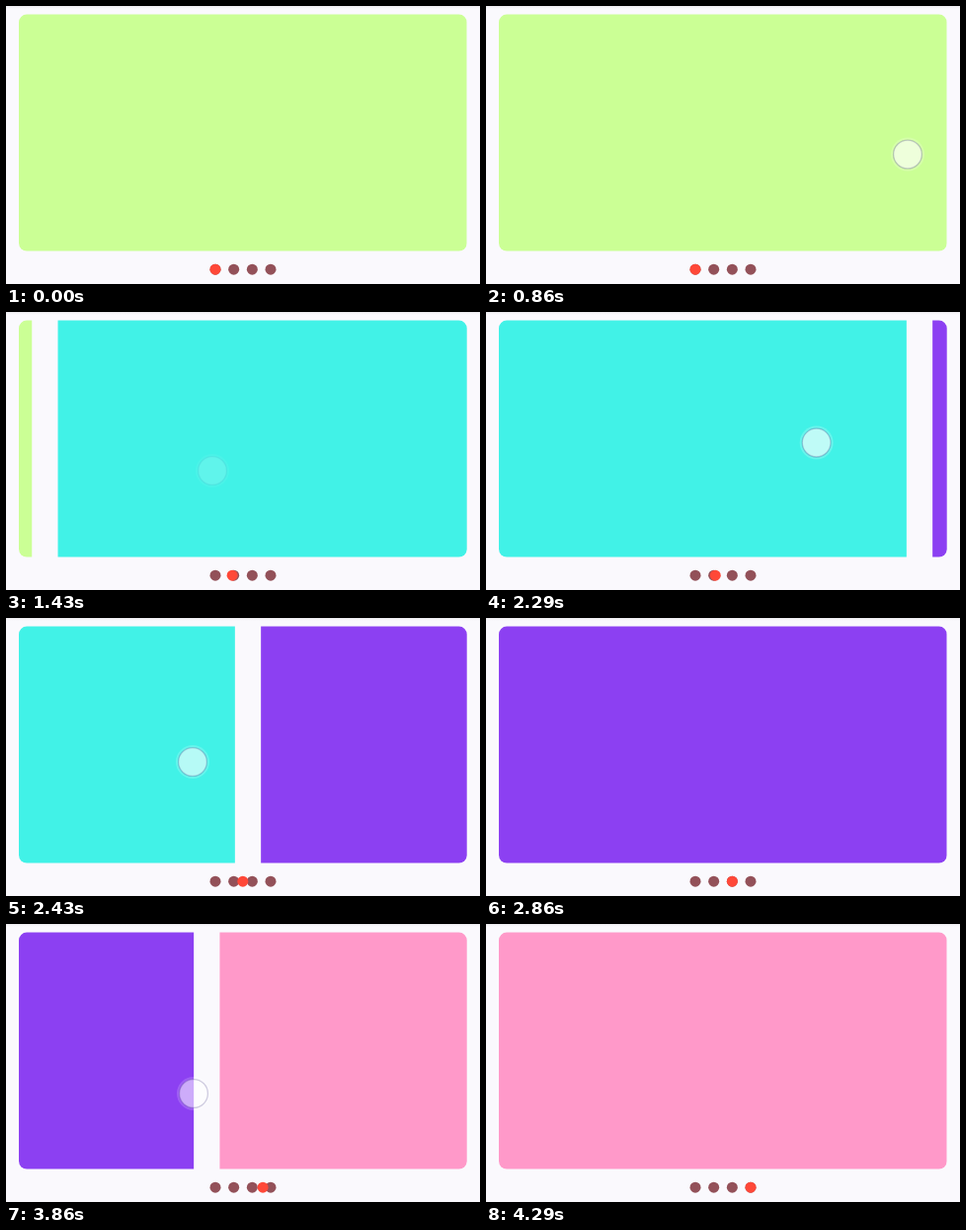
Animation, 480 px wide and 282 px high, one loop 5.14 s. Source, as an HTML page:

```html
<!DOCTYPE html>
<html lang="en">
<head>
<meta charset="utf-8">
<title>Page carousel</title>
<style>
  html, body { margin: 0; width: 100%; height: 100%; overflow: hidden; background: #faf9fd; }
  svg { display: block; width: 100%; height: 100%; }
</style>
</head>
<body>
<svg viewBox="0 0 480 282">
  <defs>
    <clipPath id="viewport"><rect x="13" y="8.6" width="453.7" height="239.9" rx="8"/></clipPath>
    <linearGradient id="shade" x2="0" y2="1">
      <stop stop-color="#efeef2"/><stop offset="1" stop-color="#faf9fd"/>
    </linearGradient>
  </defs>
  <rect width="480" height="282" fill="#faf9fd"/>
  <rect width="480" height="3" fill="url(#shade)"/>
  <g clip-path="url(#viewport)"><g id="pages"></g></g>
  <g id="dots" fill="#935159"></g>
  <g id="touch">
    <circle r="17" fill="#fff" fill-opacity=".2"/>
    <circle r="14.4" fill="#fff" fill-opacity=".58" stroke="#50468c" stroke-opacity=".3" stroke-width="1.3"/>
  </g>
</svg>
<script>
const LOOP = 5140;
const FPS = 7;
const STRIDE = 480;
const DOT_GAP = 56 / 3;
const SLOP = 36;       // finger travel before the page follows
const FLING_RATE = 2;  // decay per tick after release
const FADE_RATE = 0.75;
const COLORS = ['#cbff95', '#41f2e7', '#8c40f2', '#ff99c9'];

// Times in ticks of 1/7 s; the finger is down from the tick containing start.
const SWIPES = [
  { start: 6.48, release: 8.99, from: { x: 427, y: 150.5 }, to: { x: 209, y: 161 } },
  { start: 15.52, release: 16.91, from: { x: 411.5, y: 132 }, to: { x: 189, y: 146 } },
  { start: 24.2, release: 26.81, from: { x: 408.5, y: 150.5 }, to: { x: 190, y: 172 } }
];

const pages = document.getElementById('pages');
const dots = document.getElementById('dots');
const touch = document.getElementById('touch');

function add(parent, tag, attributes) {
  const node = document.createElementNS('http://www.w3.org/2000/svg', tag);
  for (const name in attributes) node.setAttribute(name, attributes[name]);
  return parent.appendChild(node);
}

const addDot = (index, extra) =>
  add(dots, 'circle', { cx: 212 + index * DOT_GAP, cy: 267.2, r: 5.5, ...extra });

COLORS.forEach((fill, i) => {
  add(pages, 'rect', { x: 13 + i * STRIDE, y: 8, width: 453.7, height: 242, fill });
  addDot(i);
});
const activeDot = addDot(0, { fill: '#ff4838' });

const clamp = value => Math.min(1, Math.max(0, value));
const mix = (a, b, amount) => a + (b - a) * amount;

function swipeState({ start, release, from, to }, tick) {
  const progress = clamp((tick - start) / (release - start));
  const x = mix(from.x, to.x, progress);
  const y = mix(from.y, to.y, progress ** 3);
  const sinceRelease = Math.max(0, tick - release);
  const dragged = Math.max(0, from.x - x - SLOP);
  const remaining = (STRIDE - dragged) * Math.exp(-FLING_RATE * sinceRelease);
  const opacity = tick < Math.floor(start) ? 0 : clamp(1 - FADE_RATE * sinceRelease);
  return { x, y, opacity, offset: remaining < 1 ? STRIDE : STRIDE - remaining };
}

function render(time) {
  const tick = Math.floor((time + 5) * FPS / 1000);
  const states = SWIPES.map(swipe => swipeState(swipe, tick));
  const scroll = states.reduce((sum, state) => sum + state.offset, 0);
  const finger = states.find(state => state.opacity > 0);

  pages.setAttribute('transform', `translate(${-scroll} 0)`);
  activeDot.setAttribute('cx', 212 + scroll / STRIDE * DOT_GAP);
  touch.setAttribute('opacity', finger ? finger.opacity : 0);
  if (finger) touch.setAttribute('transform', `translate(${finger.x} ${finger.y})`);
}

const startTime = performance.now();
function animate() {
  render((performance.now() - startTime) % LOOP);
  requestAnimationFrame(animate);
}
animate();
</script>
</body>
</html>
```
